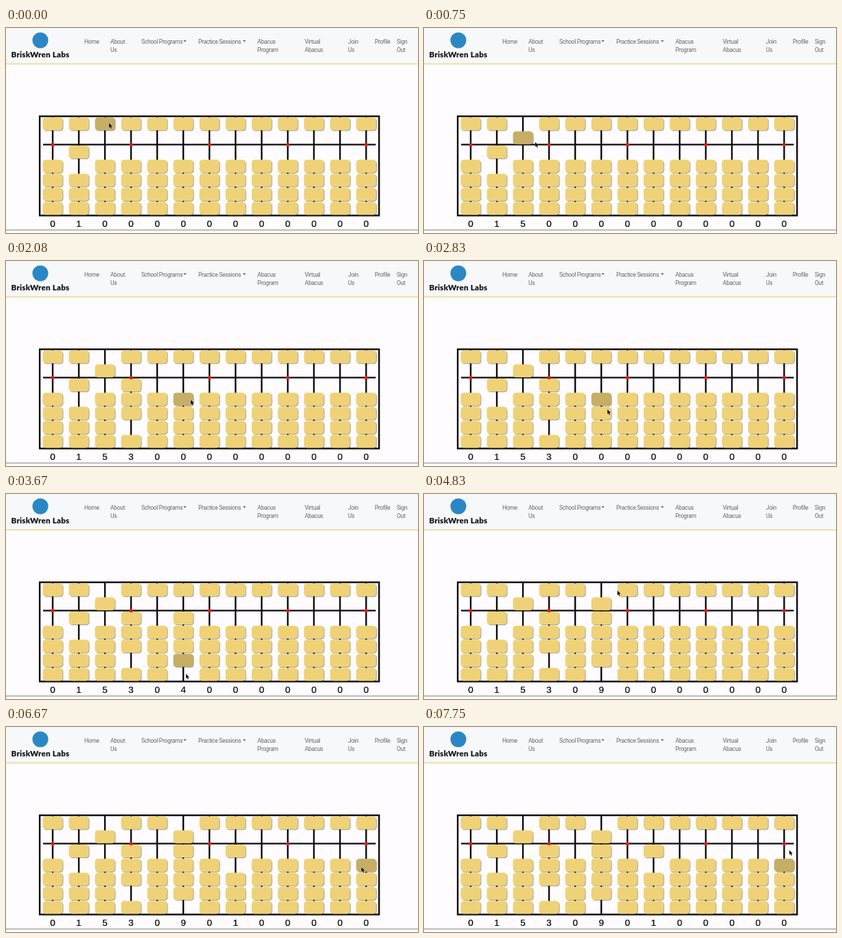
Write an HTML page that moves like this. It is 600x300 px and loops after 8 s.

```html
<!DOCTYPE html>
<html lang="en">
<head>
<meta charset="utf-8">
<title>Virtual abacus</title>
<style>
  html, body { margin: 0; width: 100%; height: 100%; overflow: hidden; background: #fefcfe; }
  svg { display: block; width: 600px; height: 300px; }
  .nav { font: 8.6px Roboto, "Liberation Sans", sans-serif; letter-spacing: -.36px; fill: #66676a; }
  .brand { font: 900 11.6px Lato, "Open Sans", sans-serif; fill: #111; text-anchor: middle; letter-spacing: .2px; }
  .digit { font: 13.5px "Liberation Sans", Arial, sans-serif; fill: #000; stroke: #000; stroke-width: .2; text-anchor: middle; }
  .bead { fill: #efd277; filter: drop-shadow(1.4px 1.4px .7px rgba(0, 0, 0, .34)); }
  .bead.hover { fill: #c7ae65; }
  .wood { stroke: #0d0b0c; stroke-width: 2.4; fill: none; }
</style>
</head>
<body>
<svg viewBox="0 0 600 300">
  <rect width="600" height="51.6" fill="#f7f8fa"/>
  <rect y="51.6" width="600" height="1.8" fill="#ecdc9c"/>
  <circle cx="50" cy="18" r="11.5" fill="#2b87c4"/>
  <text class="brand" x="50" y="43">BriskWren Labs</text>
  <g id="nav" class="nav"></g>
  <path d="M258.3 18h4.6l-2.3 2.4zM344.8 18h4.6l-2.3 2.4z" fill="#66676a"/>
  <rect y="294.6" width="600" height="2" fill="#b9b8ba"/>
  <g id="rods" class="wood"></g>
  <rect class="wood" x="49.1" y="129.2" width="494.2" height="145.2"/>
  <path class="wood" d="M54 170.6H538.5"/>
  <g id="beads"></g>
  <g id="dots" fill="#f5140f"></g>
  <g id="digits"></g>
  <path id="cursor" d="M0 0V7.2L1.6 5.8L2.8 8.4L4.1 7.8L3 5.3H5.2Z" fill="#000" stroke="#fff" stroke-opacity=".55" stroke-width=".5"/>
</svg>
<script>
const LOOP = 8000, STEP = 1000 / 12, STEPS = 96;
const COLS = 13, TOP = 4, BEAD_W = 29, BEAD_H = 19;
const $ = id => document.getElementById(id);
const colX = i => 68 + 38.04 * i;

function add(parent, tag, attrs, text = "") {
  const el = document.createElementNS("http://www.w3.org/2000/svg", tag);
  for (const name in attrs) el.setAttribute(name, attrs[name]);
  el.textContent = text;
  $(parent).appendChild(el);
  return el;
}

const links = [
  [114, "Home"], [152, "About", "Us"], [197, "School Programs"], [280, "Practice Sessions"],
  [366, "Abacus", "Program"], [435, "Virtual", "Abacus"], [498, "Join", "Us"],
  [537, "Profile"], [569, "Sign", "Out"]
];
for (const [x, ...lines] of links)
  lines.forEach((line, i) => add("nav", "text", { x, y: 22.6 + 12.2 * i }, line));

const columns = Array.from({ length: COLS }, (_, i) => {
  const x = colX(i);
  add("rods", "path", { d: `M${x} 130V274` });
  if (i % 3 === 0) add("dots", "circle", { cx: x, cy: 170.8, r: 2.5 });
  return {
    beads: Array.from({ length: TOP + 1 }, () =>
      add("beads", "rect", { class: "bead", x: x - BEAD_W / 2, width: BEAD_W, height: BEAD_H, rx: 4.5 })),
    label: add("digits", "text", { class: "digit", x, y: 290.5 })
  };
});

// cursor rests: arrival step, departure step, x, y
const rests = [
  [0, 6, 150, 139], [15, 16, 190, 233], [18, 21, 190, 240], [25, 32, 269, 203],
  [34, 34, 267, 217], [37, 44, 262, 263], [48, 49, 264, 141], [52, 58, 281.5, 141],
  [65, 67, 334, 203], [77, 82, 517.5, 205], [92, STEPS, 532, 180]
];
const clicks = [1, 20, 40, 49, 66, 84, 93];

function cursorAt(step) {
  const n = rests.findIndex(r => step <= r[1]);
  const [arrive, , x, y] = rests[n];
  if (step >= arrive) return [x, y];
  const [, leave, x0, y0] = rests[n - 1];
  const u = (step - leave) / (arrive - leave);
  const e = (u + u * u * (3 - 2 * u)) / 2;
  return [x0 + (x - x0) * e, y0 + (y - y0) * e];
}

function beadY(bead, digit) {
  if (bead === TOP) return digit >= 5 ? 151.3 : 130.8;
  return 172 + 20.65 * (bead < digit % 5 ? bead : bead + 1);
}

function hit([x, y], digits) {
  const col = Math.round((x - 68) / 38.04);
  if (Math.abs(x - colX(col)) > BEAD_W / 2) return null;
  const bead = columns[col].beads.findIndex((_, j) => {
    const dy = y - beadY(j, digits[col]);
    return dy >= 0 && dy <= BEAD_H;
  });
  return bead < 0 ? null : { col, bead };
}

// digit after pushing a bead towards or away from the beam
function push(digit, bead) {
  if (bead === TOP) return (digit + 5) % 10;
  const ones = digit % 5;
  return digit - ones + (bead < ones ? bead : bead + 1);
}

// the highlight trails the moving cursor by one step
function simulate() {
  const frames = [];
  let digits = Array(COLS).fill(0);
  digits[1] = 1;
  let hover = hit(cursorAt(0), digits);
  for (let k = 0; k < STEPS; k++) {
    const at = cursorAt(k), before = cursorAt(Math.max(0, k - 1));
    if (k > 1 && String(before) !== String(cursorAt(k - 2))) hover = hit(before, digits);
    const target = clicks.includes(k) && hit(at, digits);
    if (target) {
      digits = digits.slice();
      digits[target.col] = push(digits[target.col], target.bead);
    }
    frames.push({ at, digits, hover });
  }
  return frames;
}
const frames = simulate();

function draw({ at, digits, hover }) {
  columns.forEach(({ beads, label }, i) => {
    label.textContent = digits[i];
    beads.forEach((el, j) => {
      el.setAttribute("y", beadY(j, digits[i]));
      el.classList.toggle("hover", !!hover && hover.col === i && hover.bead === j);
    });
  });
  $("cursor").setAttribute("transform", `translate(${at})`);
}

const start = performance.now();
let last = 0;
function tick(now) {
  const t = Math.max(0, now - start) % LOOP;
  const step = Math.floor((t + 4) / STEP) % STEPS;
  if (step !== last) draw(frames[last = step]);
  requestAnimationFrame(tick);
}
draw(frames[0]);
requestAnimationFrame(tick);
</script>
</body>
</html>
```
